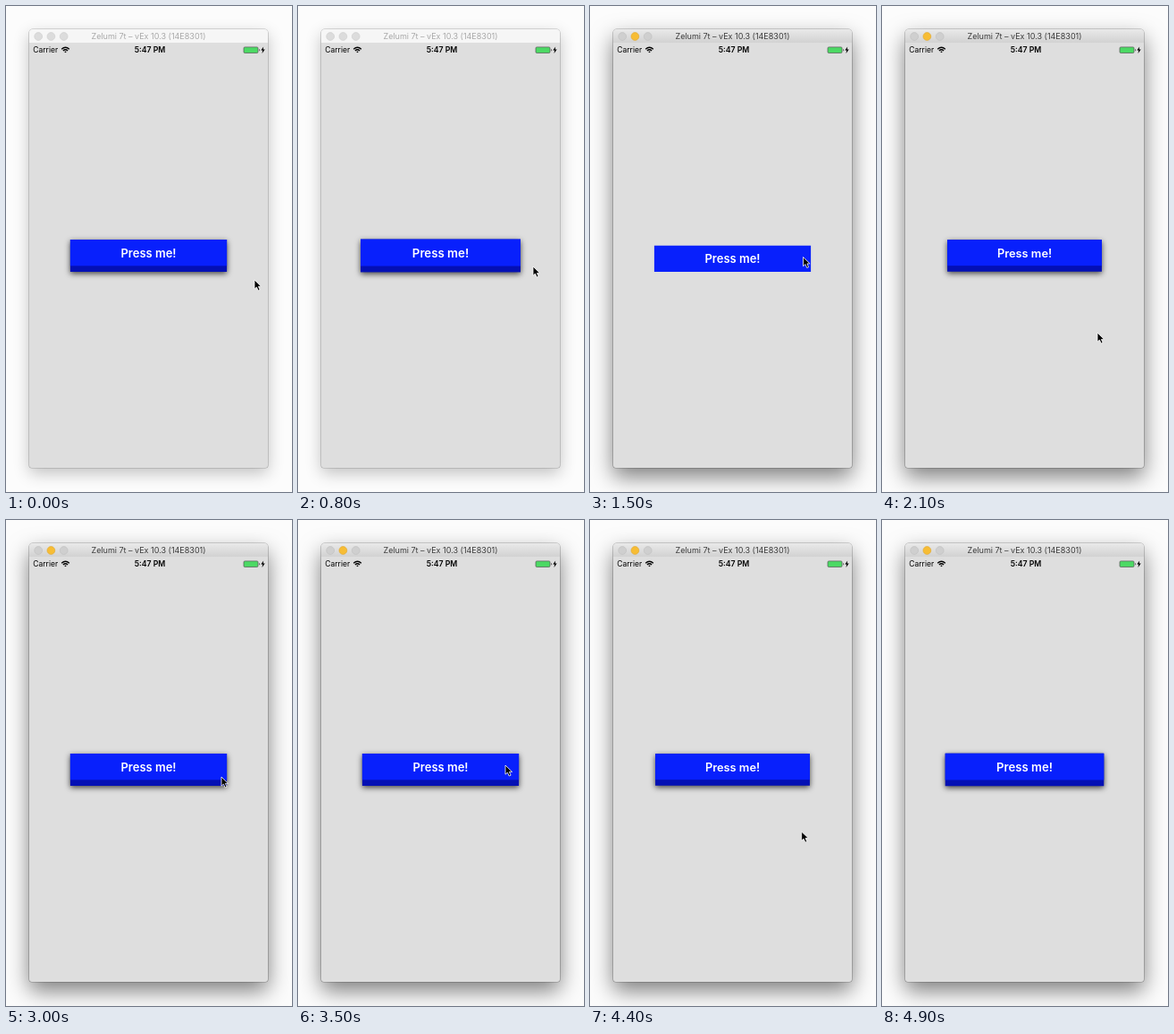
These frames come from a looping animation (320x543 px, 5000 ms). An HTML page:

```html
<!DOCTYPE html>
<html lang="en">
<head>
<meta charset="utf-8">
<style>
  html, body { margin: 0; width: 100%; height: 100%; overflow: hidden; background: #fcfcfc; }
  #win {
    position: absolute; left: 26px; top: 26px; width: 267px; height: 490px;
    border-radius: 4px 4px 3px 3px; overflow: hidden; background: #dedede;
    box-shadow: 0 0 0 .6px rgba(0,0,0,.25), 0 6px 18px rgba(0,0,0,.24);
  }
  #bar { height: 15px; background: #f6f6f6; }
  .active #win { box-shadow: 0 0 0 .6px rgba(0,0,0,.3), 0 10px 25px rgba(0,0,0,.5); }
  .active #bar { background: linear-gradient(#e9e9e9, #d2d2d2); }
  svg { position: absolute; left: 0; top: 0; font-family: Inter, "Open Sans", sans-serif; }
  #title { font-size: 9px; fill: #a8a8a8; }
  .active #title { fill: #3c3c3c; }
  .dot { fill: #dcdcdc; stroke: #cbcbcb; stroke-width: .6; }
  .active .dot { fill: #cfcfcf; stroke: #bebebe; }
  .active .mid { fill: #f7bd35; stroke: #dfa429; }
  #raised { filter: drop-shadow(0 2px 3px rgba(0,0,0,.7)); }
</style>
</head>
<body>
<div id="win"><div id="bar"></div></div>
<svg width="320" height="543" viewBox="0 0 320 543">
  <circle class="dot" cx="36.2" cy="34" r="4.4"/>
  <circle class="dot mid" cx="50.4" cy="34" r="4.4"/>
  <circle class="dot" cx="64.7" cy="34" r="4.4"/>
  <text id="title" x="159.5" y="37.4" text-anchor="middle">Zelumi 7t – vEx 10.3 (14E8301)</text>

  <text x="30.3" y="52.2" font-size="8.5">Carrier</text>
  <g fill="none" stroke="#000" stroke-width="1.4">
    <path d="M62.2 48.2Q66.5 44.2 70.8 48.2M63.9 50Q66.5 47.7 69.1 50"/>
    <path d="M65.2 50.9Q66.5 50 67.8 50.9L66.5 52.3Z" fill="#000" stroke="none"/>
  </g>
  <text x="161" y="52.2" font-size="8.7" font-weight="600" text-anchor="middle">5:47 PM</text>
  <rect x="266" y="45.9" width="16" height="6.6" rx="1.2" fill="#4cd964" stroke="#555" stroke-width=".7"/>
  <path d="M283.1 48v2.4q1-.3 1-1.2t-1-1.2" fill="#555"/>
  <path d="M288.2 45.4L285.2 49.6H287.1L286.5 53L289.7 48.5H287.7Z"/>

  <g id="button">
    <g id="raised">
      <rect x="-87.6" y="-18" width="175.2" height="36" fill="#0410b4"/>
    </g>
    <g id="face">
      <rect x="-87.6" y="-18" width="175.2" height="29.3" fill="#0820fc"/>
      <text y="1.6" font-size="13" font-weight="600" fill="#fff" text-anchor="middle">Press me!</text>
    </g>
  </g>

  <path id="cursor" d="M0 0V10.2L2.4 8.1L4.2 12L6.1 11.2L4.4 7.4H7.6Z" stroke="#fff" stroke-width=".8"/>
</svg>
<script>
const $ = id => document.getElementById(id);
const LOOP = 5000, STEP = 100;

// Pointer stops: time, x, y
const path = [
  [0, 278, 306], [800, 263, 291], [1300, 239, 281], [1700, 238, 280],
  [2100, 241, 365], [2400, 241, 365], [3000, 241, 287], [3500, 232, 274],
  [4200, 232, 274], [4800, 250, 560], [5000, 250, 560]
];
const presses = [[1300, 1700], [3600, 4200]];

function pointerAt(t) {
  const i = path.findIndex(p => p[0] > t);
  const [t0, x0, y0] = path[i - 1], [t1, x1, y1] = path[i];
  const u = (t - t0) / (t1 - t0), e = u * u * (3 - 2 * u);
  return [x0 + (x1 - x0) * e, y0 + (y1 - y0) * e];
}

function draw(now) {
  const t = Math.floor(now % LOOP / STEP) * STEP;
  const scale = 1 - 0.0228 * Math.sin(t / 1000 * 2 * Math.PI);
  const down = presses.some(([a, b]) => t >= a && t < b);

  document.body.className = t >= 1300 ? "active" : "";
  $("button").setAttribute("transform", `translate(159.5 279) scale(${scale})`);
  $("raised").style.display = down ? "none" : "";
  $("face").setAttribute("transform", `translate(0 ${down ? 6.7 : 0})`);
  $("cursor").setAttribute("transform", `translate(${pointerAt(t)})`);
}

const start = performance.now();
function tick() {
  draw(performance.now() - start);
  requestAnimationFrame(tick);
}
tick();
</script>
</body>
</html>
```
